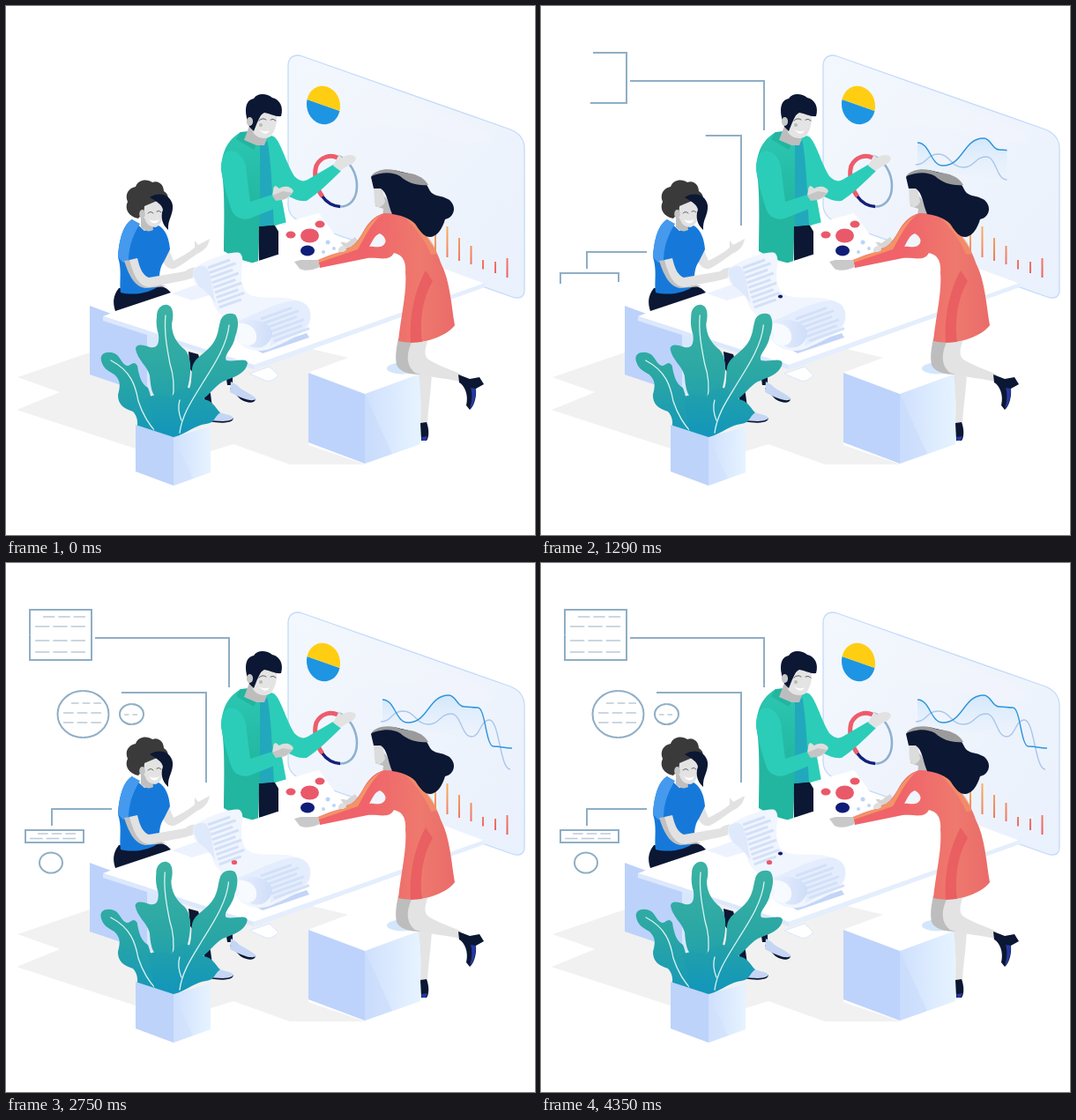
An HTML page that plays this animation: 600x600 px, repeating every 4550 ms.

```html
<!DOCTYPE html>
<html lang="en">
<head>
<meta charset="utf-8">
<title>Team at work</title>
<style>
html, body { margin: 0; width: 100%; height: 100%; overflow: hidden; background: #fff; }
svg { display: block; width: 100vw; height: 100vh; }
#wires { fill: none; stroke: #8faec5; stroke-width: 2; }
#notes { fill: none; stroke: #bccad8; stroke-width: 1.4; }
#chart { fill: none; stroke-width: 1.4; }
.vein { fill: none; stroke: #d8f3f0; stroke-width: 1.3; stroke-linecap: round; }
.mark { fill: none; stroke: #d3e0f8; stroke-width: 3; }
.fine { fill: none; stroke: #555; stroke-width: .9; stroke-linecap: round; }
</style>
</head>
<body>
<svg viewBox="0 0 600 600">
<defs>
  <linearGradient id="board" x1="0" y1="0" x2="1" y2="1"><stop offset="0" stop-color="#f3f8ff"/><stop offset=".5" stop-color="#eff4fc"/><stop offset="1" stop-color="#e9f1fd"/></linearGradient>
  <linearGradient id="area" x1="0" y1="0" x2="0" y2="1"><stop offset="0" stop-color="#d2e7fb"/><stop offset="1" stop-color="#eef4fd" stop-opacity="0"/></linearGradient>
  <linearGradient id="bar" x1="0" y1="250" x2="0" y2="308" gradientUnits="userSpaceOnUse"><stop offset="0" stop-color="#f7b25c"/><stop offset="1" stop-color="#ee5b68"/></linearGradient>
  <linearGradient id="dress"><stop offset=".35" stop-color="#f0636a"/><stop offset=".75" stop-color="#ee796d"/><stop offset="1" stop-color="#ea6b6a"/></linearGradient>
  <linearGradient id="coat" x1="0" y1="0" x2="0" y2="1"><stop offset=".1" stop-color="#2ac4af"/><stop offset=".6" stop-color="#22b59f"/></linearGradient>
  <linearGradient id="leaf" x1="0" y1="345" x2="0" y2="488" gradientUnits="userSpaceOnUse"><stop offset="0" stop-color="#3bb2a4"/><stop offset=".5" stop-color="#2ba7a4"/><stop offset="1" stop-color="#1598b8"/></linearGradient>
  <linearGradient id="low" x1="0" y1="430" x2="0" y2="488" gradientUnits="userSpaceOnUse"><stop offset="0" stop-color="#23a2a8"/><stop offset="1" stop-color="#1296bb"/></linearGradient>
  <linearGradient id="side"><stop offset="0" stop-color="#cfe0fd"/><stop offset="1" stop-color="#e6f3ff"/></linearGradient>
  <linearGradient id="roll"><stop offset="0" stop-color="#eaf1fe"/><stop offset="1" stop-color="#cfddf8"/></linearGradient>
  <clipPath id="reveal"><rect id="window" x="420" y="130" width="0" height="120"/></clipPath>
</defs>

<path fill="#f1f1f1" d="M13 421L95 393L180 380L330 385L389 399L343 416V498L408 520H322L258 497L232 505L150 503L12 458L61 438Z"/>

<!-- board -->
<path fill="url(#board)" stroke="#c3dafb" stroke-width="1.3" d="M320 68C320 58 327 54 336 57L572 140C582 144 588 152 588 162V322C588 330 583 333 574 330L335 245Q320 239 320 225Z"/>
<path fill="#f3f6fc" opacity=".7" d="M400 118C415 95 445 98 470 112C500 125 530 132 553 152C530 160 500 150 480 143C450 135 420 140 400 118Z"/>
<path fill="#1d95e3" d="M341.500 106A18.500 21.500 -12 0 0 378.500 119Z"/>
<path fill="#ffce12" d="M341.500 106A18.500 21.500 -12 0 1 378.500 119Z"/>
<g fill="none">
  <path stroke="#8fb0cf" stroke-width="2.6" d="M377 170C390 175 398 190 398 204C398 219 390 228 378 227.500"/>
  <path stroke="#14207a" stroke-width="3.500" d="M358 215C363 222 370 227 379 227.500"/>
  <path stroke="#ee5c6b" stroke-width="5" d="M376 172C368 168 357 171 352 181C349 191 351 206 359 216"/>
</g>
<g id="chart" clip-path="url(#reveal)"></g>
<path stroke="url(#bar)" stroke-width="2" d="M487 256V279M500.500 250V285M514 263V289M527.500 272V293M541 288V298.500M555 290V303M568.500 286V308"/>

<!-- bench and legs -->
<path fill="#bcd2fa" d="M95 340L160 364V440L95 418Z"/>
<path fill="#d9e7fd" d="M160 364L200 352V440H160Z"/>
<path fill="#0b1733" d="M207 392L218 395L232 440L235 463H228L222 430L209 412ZM248 410L257 412V430L251 430Z"/>
<path fill="#0b1733" d="M254 434L258 430L283 446C282 451 274 451 266 446ZM228 466L258 467C258 473 246 474 230 471Z"/>
<path fill="#c5d5f4" d="M255 426L262 430C266 436 279 439 284 446C278 449 269 446 254 438ZM232 462L243 461C250 464 256 463 258 468C250 473 240 470 228 470Z"/>

<!-- man -->
<path fill="#0b1733" d="M286 249L309 247V284L287 289Z"/>
<path fill="url(#coat)" d="M266 143C250 153 245 166 244 185C249 207 247 250 247 278C260 286 273 290 286 293L287 250L312 248L308 215L318 210L316 170L302 147L287 153Z"/>
<path fill="#22a8bd" d="M288 156L297 153C301 180 302 218 304 248L288 250Z"/>
<path fill="#2bcdb8" d="M296 150L304 148C312 155 316 174 327 193C332 198 337 200 342 197L371 180L380 187C366 201 352 214 341 221C332 222 322 218 311 209L318 247L304 249C302 218 302 180 296 150Z"/>
<path fill="#2bcdb8" d="M250 166C262 160 273 174 273 190L277 222L302 214L309 228L279 240C270 244 260 241 256 232C250 214 244 190 244 184C244 176 246 169 250 166Z"/>
<path fill="#22b59f" d="M266 143L275 142L286 154L281 163L261 151Z"/>
<path fill="#bdbdbd" d="M276 136L290 146L296 150L293 158L284 158L270 152Z"/>
<path fill="#e4e4e4" d="M283 125C290 119 301 119 307 123C308 134 304 146 298 149C290 152 281 148 279 140Z"/>
<path fill="#0b1733" d="M273 127C270 113 274 106 281 105C285 98 296 99 302 104C311 106 315 115 312 125C306 126 300 122 293 121C288 123 287 129 285 132L281 142L276 137Z"/>
<ellipse cx="276.500" cy="131" rx="3.600" ry="5" fill="#c7c7c7"/>
<path class="fine" d="M287 130Q291 126 295 129M300 129Q303 127 306 130"/>
<circle cx="289" cy="135" r="2" fill="#b9b9b9"/>
<path fill="#fff" d="M287 140Q293 144 299 141Q295 149 287 140Z"/>
<path fill="#dedede" d="M302 214C304 209 302 205 306 204L310 207C316 203 324 205 326 210C322 217 315 221 309 220Z"/>
<path fill="#c5c5c5" d="M302 215L314 210L325 212L317 219L306 221Z"/>
<path fill="#e2e2e2" d="M371 181C374 174 378 173 377 168L381 172C387 168 396 168 397 173C395 180 388 180 379 187Z"/>

<!-- table -->
<path fill="#fff" d="M110 352L190 321L308 282L420 275L500 299L543 315L281 407Z"/>
<path fill="#dce8fd" d="M110 352L281 407V412L110 357Z"/>
<path fill="#e4eefd" d="M281 407L543 314V319L281 413Z"/>
<path fill="#fff" stroke="#dbe7fc" d="M276 417L299 409L309 419Q301 427 295 425Z"/>
<path fill="#edf3fe" d="M188 326L222 314L234 327L211 334Z"/>

<!-- seated woman -->
<path fill="#0b1733" d="M128 320C121 329 121 337 124 346L187 325C181 318 175 317 168 317Z"/>
<path fill="#e2e2e2" d="M178 289L185 277L190 289C199 284 207 280 214 274V266L218 271L231 264C230 271 226 277 217 281C207 288 199 294 191 298C185 299 180 295 178 289Z"/>
<path fill="#1679da" d="M143 242C134 247 128 263 127 285C132 300 128 314 130 325C146 329 165 325 174 317C173 302 176 294 179 290L186 276C185 261 179 251 171 248L157 255Z"/>
<path fill="#459aee" d="M143 242L152 247C145 258 139 272 139 289L133 291L127 285C128 263 134 247 143 242Z"/>
<path fill="#bfbfbf" d="M153 238L166 246L167 254Q160 258 153 251Z"/>
<path fill="#3a3a3a" d="M150 241C139 239 134 230 138 222C134 213 140 206 147 205C150 196 161 196 166 200C173 197 179 203 179 210C186 214 185 222 178 226L158 232Z"/>
<path fill="#e3e3e3" d="M157 227L176 219C181 234 178 249 169 251C159 250 155 242 157 227Z"/>
<path fill="#0b1733" d="M163 217C174 210 187 214 189 226C190 237 183 242 184 254C177 248 175 239 178 231C177 225 171 222 163 217Z"/>
<ellipse cx="154.500" cy="236" rx="3.300" ry="5" fill="#c4c4c4"/>
<path class="fine" d="M161 235Q164 232 167 235M171 233Q174 231 176 234"/>
<path fill="#fff" d="M162 242Q168 245 174 242Q169 251 162 242Z"/>
<path fill="#c0c0c0" d="M134 289L142 288C147 304 154 310 165 313L182 318L158 320C145 318 139 304 134 289Z"/>
<path fill="#e2e2e2" d="M140 288L149 286C152 299 156 306 162 308L203 301C211 295 219 296 224 299C219 307 210 309 203 311L163 319C149 318 144 302 140 288Z"/>

<!-- long paper -->
<path fill="#c3d5f7" d="M284 390L341 371L344 376L291 394Z"/>
<path fill="#f0f5fe" d="M212 304C211 296 220 294 228 289C243 283 258 278 265 280C273 287 263 300 269 318C274 333 290 330 315 331C336 332 348 345 345 358C343 370 318 381 299 389C284 394 271 389 263 381C256 370 262 363 250 355C235 344 234 336 232 327C230 318 224 322 218 317C213 314 212 309 212 304Z"/>
<path fill="#dfe9fc" d="M212 304C213 296 220 294 225 295C234 300 233 320 238 337C226 322 224 322 218 317Z"/>
<path fill="#e4edfd" d="M259 359C280 352 305 335 330 334C350 338 348 358 338 366L299 386C306 370 291 353 259 359Z"/>
<path id="print" class="mark"/>
<path fill="url(#roll)" d="M260 360C276 352 299 356 302 370C302 381 292 390 280 387C264 380 271 368 260 360Z"/>
<path fill="#f7faff" d="M260 360C274 358 286 365 284 378C281 389 267 385 262 379C269 372 259 366 260 360Z"/>
<g id="dots"></g>

<!-- cube -->
<path fill="#fff" d="M343 416L409 391L470 417L407 440Z"/>
<path fill="#bdd3fb" d="M343 416L407 440V519L343 495Z"/>
<path fill="url(#side)" d="M407 440L470 417V497L407 519Z"/>
<path fill="#c5d9fb" opacity=".5" d="M407 440L438 508L407 519Z"/>
<ellipse cx="449" cy="411" rx="17" ry="6.500" fill="#d3e6fb"/>

<!-- standing woman -->
<path fill="#e4e4e4" d="M462 408L483 411C483 432 479 452 478 474H470C471 452 470 432 468 416Z"/>
<path fill="#0b1733" d="M470 473L477 472C480 480 480 489 477 493H471Z"/>
<path fill="#2639a0" d="M471 489L478 488L476 493H472Z"/>
<path fill="#bdbdbd" d="M445 377L462 379C455 394 456 407 470 418C458 418 446 415 443 407C441 397 443 387 445 377Z"/>
<path fill="#e3e3e3" d="M461 379L479 378C475 389 474 395 478 400C488 407 503 412 517 418L515 426C498 422 478 421 464 416C453 407 454 394 461 379Z"/>
<path fill="#0b1733" d="M513 418L526 423L537 421L542 429L533 434C534 445 530 455 526 458L522 453C525 441 520 430 514 427Z"/>
<path fill="#2639a0" d="M527 433L533 434C533 445 530 454 526 457C529 447 529 439 527 433Z"/>
<path fill="#bdbdbd" d="M420 206L432 219L440 236L427 240L428 230L419 227Z"/>
<path fill="#dcdcdc" d="M417 203L427 207L430 222C426 230 420 230 418 223Z"/>
<path fill="#d6d6d6" d="M369 277C374 269 380 266 386 269L396 262L400 268C394 276 386 280 374 281Z"/>
<path fill="url(#dress)" d="M429 235C417 238 410 247 404 258C399 266 395 273 386 275L354 288L356 297L410 286C424 285 435 290 440 280C450 282 454 290 453 302C455 324 448 351 445 380C470 386 500 375 509 362C505 340 504 312 493 291C488 273 471 253 455 236Z"/>
<path fill="#e9595f" opacity=".8" d="M476 300C466 318 457 346 459 382L472 381C468 350 476 325 484 312Z"/>
<path fill="#f5a367" opacity=".75" d="M427 236C416 241 408 251 402 262C396 273 388 276 354 288L355 291L399 276C408 261 414 246 427 236Z"/>
<path fill="#f59a68" opacity=".6" d="M452 239C465 252 476 266 482 282L489 281C485 266 470 251 455 236Z"/>
<path fill="#f1f5fc" d="M412 273C416 266 418 260 424 258C431 262 433 268 427 272C421 275 416 272 412 273Z"/>
<path fill="#0b1733" d="M414 194C420 186 435 184 448 188C465 191 476 198 480 208C484 217 494 214 503 220C512 228 508 240 498 242C495 252 490 261 481 262C474 262 470 256 464 247C457 240 446 237 438 236C433 225 433 212 425 207L417 207Z"/>
<path fill="#9b9b9b" d="M414 193C421 184 437 183 450 189C463 189 474 194 479 203C466 204 456 201 447 193C437 187 425 189 414 193Z"/>
<path fill="#fff" d="M305 249L355 235L386 277L331 293Z"/>
<g fill="#e9596a"><ellipse cx="323" cy="259.500" rx="5.500" ry="4"/><ellipse cx="344.500" cy="260.500" rx="10.500" ry="8"/><ellipse cx="356" cy="247.500" rx="5.500" ry="4"/></g>
<ellipse cx="342" cy="277.500" rx="8" ry="6" fill="#101d78"/>
<g fill="#b9d6f7"><circle cx="365" cy="268" r="2.500"/><circle cx="360" cy="279" r="2"/><circle cx="372" cy="275" r="2"/></g>
<path fill="#c9c9c9" d="M327 290L334 288L354 288L356 296C348 300 338 301 333 298Z"/>
<path fill="#dedede" d="M377 279C376 273 382 270 387 274L383 279Z"/>

<g id="plant">
  <path fill="url(#leaf)" d="M108 402C106 393 116 391 123 394C130 397 130 405 137 408C142 408 145 401 149 408C151 421 154 429 161 433C166 444 168 470 178 487L147 482C151 474 149 465 144 460C133 456 127 452 127 441C130 430 130 425 123 418C116 414 110 411 108 402Z"/>
  <path class="vein" d="M119 402C142 414 147 431 150 448C155 463 162 475 171 484"/>
  <path fill="url(#leaf)" d="M171 352C171 342 178 338 183 339C191 341 190 353 188 361C188 372 193 382 203 390C212 400 210 420 205 437L190 488L172 447C165 440 164 431 163 419C160 408 149 401 147 389C148 382 157 385 163 387C172 389 174 382 173 373C171 366 170 360 171 352Z"/>
  <path class="vein" d="M181 351C179 370 183 390 186 406C191 421 191 433 189 446"/>
  <path fill="url(#leaf)" d="M243 358C245 349 254 347 260 350C265 356 263 367 260 375C258 388 246 396 250 402C260 404 273 398 274 405C272 418 255 422 246 426C237 431 232 440 222 447L196 488L186 480C191 460 205 450 208 434C212 424 209 412 213 405C218 396 230 392 237 379C241 371 241 365 243 358Z"/>
  <path fill="url(#low)" d="M160 444C169 440 180 440 187 445C192 436 199 432 207 433C216 437 219 445 228 447C236 450 239 458 243 461C236 466 237 473 227 474C216 475 207 483 190 490L169 484C164 470 167 456 160 444Z"/>
  <path class="vein" d="M253 362C251 384 236 407 224 426C212 446 200 462 197 484"/>
  <path class="vein" d="M197 447C194 457 197 465 199 470"/>
</g>
<path fill="#bdd3fa" d="M147 475L190 489V544L147 528Z"/>
<path fill="url(#side)" d="M190 489L232 477V529L190 544Z"/>
<path fill="#d0e1fd" opacity=".6" d="M190 489L212 536L190 544Z"/>

<g id="wires"></g>
<g id="notes"></g>
</svg>
<script>
const LOOP = 4550, REST = 4350, SWING = REST / 3;
const $ = id => document.getElementById(id);
const part = (t, a, b) => Math.max(0, Math.min(1, (t - a) / (b - a)));
const range = (n, f) => Array.from({ length: n }, (_, i) => f(i));

function add(parent, tag, attrs) {
  const el = document.createElementNS('http://www.w3.org/2000/svg', tag);
  for (const k in attrs) el.setAttribute(k, attrs[k]);
  return parent.appendChild(el);
}

// level at every point, S-shaped in between
function wave(points) {
  return points.map(([x, y], i) => {
    if (!i) return `M${x} ${y}`;
    const [px, py] = points[i - 1], mid = (px + x) / 2;
    return `C${mid} ${py} ${mid} ${y} ${x} ${y}`;
  }).join('');
}

const main = wave([[427, 155], [456, 181], [502, 150], [520, 163], [535, 164], [553, 208], [574, 210]]);
const second = wave([[425, 180], [450, 168], [479, 183], [505, 171], [528, 197], [548, 178], [572, 234]]);
add($('chart'), 'path', { d: main + 'L524 197L427 185Z', fill: 'url(#area)' });
add($('chart'), 'path', { d: second, stroke: '#abc6ea' });
add($('chart'), 'path', { d: main, stroke: '#2f96dd' });

// slanted lines of print; every other one is shorter
const print = (n, x, y, dx, dy, w) => range(n, i => {
  const len = i % 2 ? w : w - 5;
  return `M${x + dx * i} ${y + dy * i}l${len} ${-len * .36}`;
}).join('');
$('print').setAttribute('d', print(9, 229, 297, 1.6, 5.6, 30) + print(6, 289, 355, 3, 5, 40));

const wires = [];
function wire(a, b, ...paths) {
  for (const d of paths) {
    const el = add($('wires'), 'path', { d });
    wires.push({ a, b, el, len: el.getTotalLength() });
  }
}
// outlines grow both ways from one point
const box = (a, b, x, y, l, t, r, bot) => wire(a, b,
  `M${x} ${y}V${t}H${l}V${(t + bot) / 2}`, `M${x} ${y}V${bot}H${l}V${(t + bot) / 2}`);
const ring = (a, b, cx, cy, rx, ry) => wire(a, b, ...[0, 1].map(side =>
  `M${cx} ${cy - ry}A${rx} ${ry} 0 0 ${side} ${cx} ${cy + ry}`));

wire(100, 1020, 'M253 141V85H101');
wire(860, 1460, 'M227 249V147H131');
wire(590, 930, 'M120 279H52V298');
box(980, 1560, 97, 85, 27, 53, 97, 110);
wire(930, 1590, 'M52 303H22V317H55', 'M52 303H88V317H54');
ring(1400, 1850, 142.5, 171.5, 13.5, 11.5);
ring(1480, 2100, 87.5, 171.5, 29, 26.5);
const bubble = add($('wires'), 'ellipse', { cx: 51, cy: 340, rx: 13, ry: 11.5 });

// broken lines of writing, one row after another
const ROW = 250, INDENT = 9, GAP = 4;
const notes = [];
function block(start, left, right, dashes, ys) {
  ys.forEach((y, i) => {
    const x = left + (i || ys.length === 1 ? 0 : INDENT);
    const pitch = (right - x + GAP) / dashes;
    notes.push({
      a: start + i * ROW, x, right, pitch, y,
      el: add($('notes'), 'path', { 'stroke-dasharray': `${pitch - GAP} ${GAP}` })
    });
  });
}
block(1740, 33, 90, 3, [61, 72, 88, 101]);
block(2000, 65, 108, 3, [159, 170, 181]);
block(2250, 134, 149, 2, [172]);
block(1740, 27, 79, 3, [307, 312.5]);

// dots pop in and out in [on, off] spans
const POP = 250, navy = '#101d78', pink = '#e9596a';
const dots = [
  [259, 339.5, 3.2, pink, [300, 1250], [1600, LOOP]],
  [271.5, 329.5, 2.6, navy, [400, 2500], [3000, LOOP]],
  [271.5, 345.5, 5, navy, [1600, 2400], [2950, 3800]]
].map(([cx, cy, r, fill, ...spans]) => ({ r, spans, el: add($('dots'), 'ellipse', { cx, cy, fill }) }));

const pop = (t, spans) => Math.max(...spans.map(([on, off]) =>
  Math.min(part(t, on, on + POP), off === LOOP ? 1 : part(t, off, off - POP))));

const leaves = [...$('plant').children].map(el => ({ el, d: el.getAttribute('d') }));

// quick swing out, slow swing back
function sway(t) {
  const u = Math.min(t, REST) / SWING % 1;
  return Math.cos(2 * Math.PI * u ** .65);
}

// bend grows with height above the pot
function bend(d, s) {
  const push = 8.6 * (s - 1);
  return d.replace(/(\d+) (\d+)/g, (_, x, y) => {
    const h = Math.max(0, 488 - y) / 145;
    return `${(+x + push * h ** 1.8).toFixed(2)} ${y}`;
  });
}

function draw(t) {
  for (const { a, b, el, len } of wires) {
    const p = part(t, a, b);
    el.style.display = p ? '' : 'none';
    el.setAttribute('stroke-dasharray', p < 1 ? `${len * p} ${len}` : 'none');
  }
  bubble.setAttribute('opacity', part(t, 1930, 2220));
  for (const { a, x, right, y, el } of notes) {
    const p = part(t, a, a + ROW);
    el.setAttribute('d', p ? `M${x} ${y}H${x + (right - x) * p}` : '');
  }
  $('window').setAttribute('width', 160 * part(t, 240, 1790));
  for (const { r, spans, el } of dots) {
    const k = r * pop(t, spans);
    el.setAttribute('rx', k);
    el.setAttribute('ry', k * .8);
  }
  const s = sway(t);
  for (const { d, el } of leaves) el.setAttribute('d', bend(d, s));
}

const start = performance.now();
function tick(now) {
  draw(Math.max(0, now - start) % LOOP);
  requestAnimationFrame(tick);
}
draw(0);
requestAnimationFrame(tick);
</script>
</body>
</html>
```
